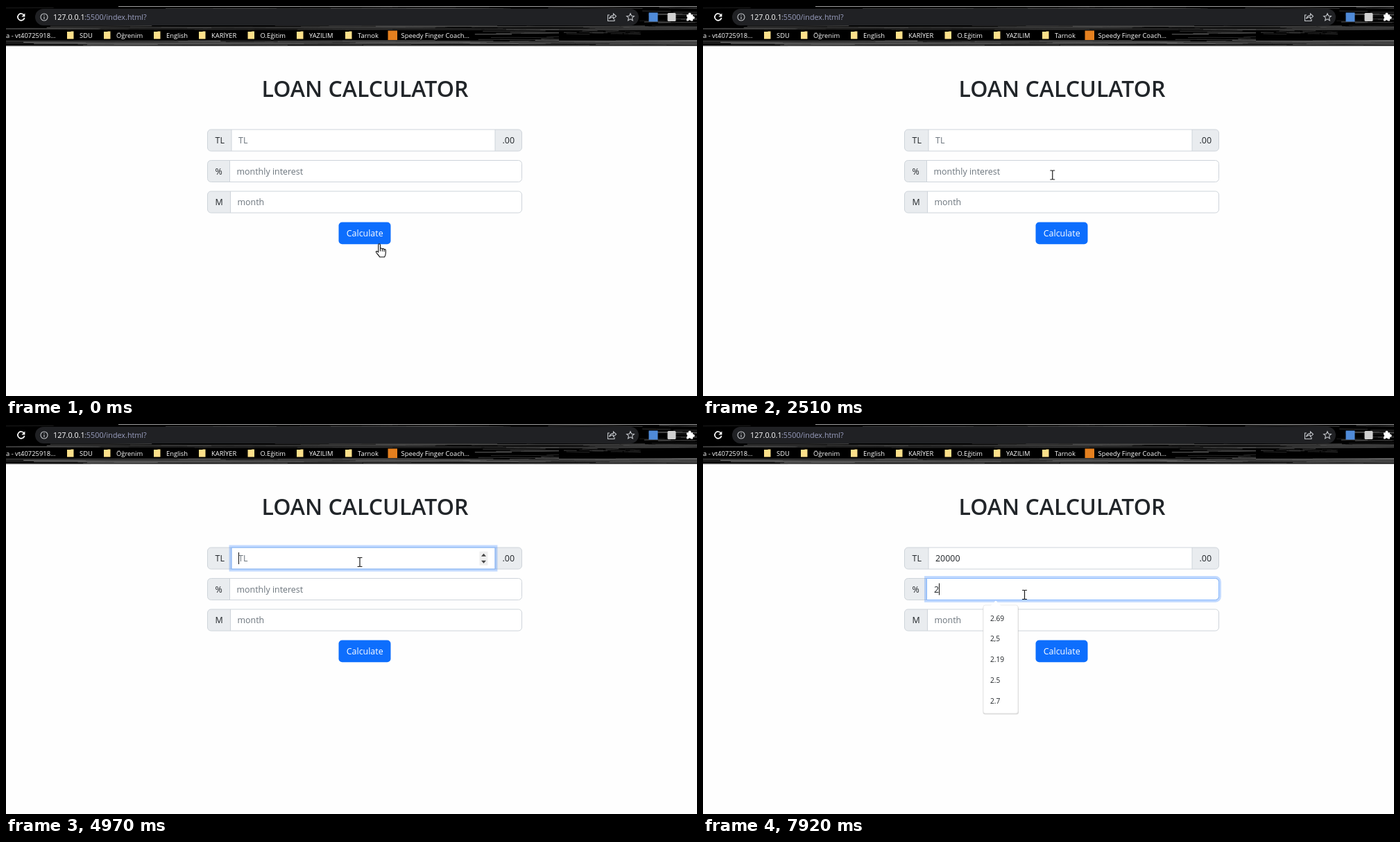
Recreate the animation shown at these times as an HTML page. Size 996 px wide and 562 px high, loop 8 s.

```html
<!DOCTYPE html>
<html lang="en">
<head>
<meta charset="utf-8">
<title>Loan calculator</title>
<style>
  html, body { margin: 0; width: 100%; height: 100%; overflow: hidden; background: #fff; }
  svg { display: block; width: 100%; height: 100%; }
  text { font-family: "Open Sans", "Noto Sans", sans-serif; font-size: 12.45px; fill: #212529; white-space: pre; }
  .hint { fill: #6c757d; }
  .mid { text-anchor: middle; }
  .mark { font-size: 9.4px; fill: #fff; }
  .url { font-size: 10.8px; fill: #fff; }
  .path { fill: #9a9fc0; }
  .item { font-size: 10.2px; }
  .line { fill: none; stroke: #ced4da; }
  .icon { fill: none; stroke: #c4c7cb; stroke-width: 1.1; }
</style>
</head>
<body>
<svg viewBox="0 0 996 562" preserveAspectRatio="none">
  <rect width="996" height="562" fill="#fefefe"/>

  <g id="browser">
    <rect width="996" height="57.5" fill="#000"/>
    <g id="grain" fill="none"></g>
    <path d="M162 .5H996" stroke="#a0a0a0"/>
    <rect x="42" y="4" width="870" height="24" rx="12" fill="#202124"/>
    <path class="icon" style="stroke:#fff;stroke-width:1.7" d="M25.8 13A4.9 4.9 0 1 0 26.6 17"/>
    <path d="M27.4 10.4V15.4H22.4Z" fill="#fff"/>
    <circle class="icon" cx="55" cy="16" r="5"/>
    <path class="icon" d="M55 15.2V19M55 12.8V14"/>
    <text class="url" x="68" y="20">127.0.0.1</text>
    <text class="url path" x="113" y="20">:5500/index.html?</text>
    <path class="icon" d="M870 13H867.5V21.5H877V19M869.5 18.5Q870.5 14 875.5 13.6V11L879.5 14.8L875.5 18.3V16Q871.5 16 869.5 18.5Z"/>
    <path class="icon" d="M900 10.7L901.6 14.2L905.4 14.6L902.5 17.1L903.4 20.9L900 18.9L896.6 20.9L897.5 17.1L894.6 14.6L898.4 14.2Z"/>
    <rect x="926.5" y="9.5" width="13" height="13" fill="#4f8ad8"/>
    <rect x="953.5" y="10" width="12" height="12" rx="1.5" fill="#d0d0d0"/>
    <path fill="#fff" d="M981 12.5H983.7A2 2 0 1 1 987.3 12.5H990V15A2 2 0 1 1 990 18.7V21.5H987A1.8 1.8 0 0 0 983.6 21.5H981V18.5A1.7 1.7 0 0 0 981 15.3Z"/>
    <g id="marks"></g>
  </g>

  <g id="alert">
    <rect x="211" y="97.5" width="612" height="48.5" rx="5" fill="#fff3cd"/>
    <text class="mid" x="517" y="127" style="fill:#664d03">Please type validate inputs!</text>
  </g>

  <g id="form">
    <text class="mid" x="517.5" y="131" style="font-size:32.1px;font-weight:600">LOAN CALCULATOR</text>
    <g id="fields"></g>
    <rect id="button" x="479.5" y="311.6" width="75" height="31.6" rx="5"/>
    <text class="mid" x="517.2" y="332.3" style="fill:#fff">Calculate</text>
    <path id="ringAmount"/><path id="ringRate"/>
    <text id="amount" x="335" y="198"></text>
    <text id="rate" x="333" y="242.5"></text>
    <g id="spinAmount"></g>
    <g id="spinMonth"></g>
    <rect id="caret" width="1" height="17" fill="#111"/>
  </g>

  <g id="list">
    <rect id="shade" x="403.5" y="262.5" width="51.5" rx="3" fill="#000" opacity=".14"/>
    <rect id="sheet" x="404" y="261" width="50" rx="3" fill="#fff" stroke="#e3e3e3" stroke-width=".7"/>
    <path d="M414.5 262L422 254.5L429.5 262Z" fill="#fff"/>
    <g id="items"></g>
  </g>

  <circle id="halo" r="10" fill="#f9f93c" opacity=".88"/>
  <g id="cursor" stroke-linejoin="round" stroke-linecap="round">
    <path id="beam" fill="none" stroke="#1c1c1c" stroke-width="1.2" d="M-3 -6.5H-1L0 -6L1 -6.5H3M0 -6V6M-3 6.5H-1L0 6L1 6.5H3"/>
    <path id="arrow" fill="#fff" stroke="#111" d="M0 0V13.5L3.2 10.6L5.3 15.5L7.4 14.6L5.3 9.8H9.6Z"/>
    <path id="hand" fill="#fff" stroke="#111" stroke-width="1.1" d="M-1.3 11V1.2Q-1.3 -.3 0 -.3T1.5 1.2V6.5Q3 5.3 4.3 7Q5.8 6 7 7.7Q9.3 7 9.3 9.5V13Q9.3 15.5 7.6 18.7H.6Q-.5 16.5 -3 14Q-5.3 11.5 -4.3 10.5Q-3 9.6 -1.3 12M1.5 6.5V10M4.3 7.2V10.2M7 8V10.5"/>
  </g>
</svg>

<script>
const LOOP = 8000, TICK = 70, SHIFT = 61;
const $ = id => document.getElementById(id);
const set = (id, attrs) => { for (const k in attrs) $(id).setAttribute(k, attrs[k]); };
const show = (id, on) => $(id).setAttribute('visibility', on ? 'visible' : 'hidden');
const clamp = v => Math.max(0, Math.min(1, v));
const ramp = (t, from, to) => clamp((t - from) / (to - from));
const within = (t, ...spans) => spans.some(([a, b]) => t >= a && t < b);
const text = (x, y, cls, s) => `<text class="${cls}" x="${x}" y="${y}">${s}</text>`;

// Long, nearly level grain of the browser theme
let seed = 11;
const rnd = (from, to) => (seed = seed * 16807 % 2147483647) / 2147483647 * (to - from) + from;
function grain(count, [left, right], [top, bottom], [short, long], [dark, light]) {
  let out = '';
  for (let i = 0; i < count; i++) {
    const x = rnd(left, right), y = rnd(top, bottom), length = Math.min(rnd(short, long), right - x);
    const grey = Math.round(rnd(dark, light)), bow = rnd(-.8, .8), drop = rnd(-.7, .7);
    out += `<path d="M${x} ${y}q${length / 2} ${bow} ${length} ${drop}"
      stroke="rgb(${grey},${grey},${grey})" stroke-width="${rnd(.5, 1.3)}"/>`;
  }
  return out;
}
$('grain').innerHTML =
  grain(16, [-80, 996], [1.5, 4], [80, 300], [30, 80]) +
  grain(34, [-80, 996], [28.5, 34], [120, 360], [30, 85]) +
  grain(56, [-80, 996], [50, 57], [120, 400], [40, 120]) +
  grain(16, [668, 797], [33, 51], [40, 110], [35, 85]) +
  grain(16, [912, 996], [4, 28], [30, 84], [35, 95]) +
  grain(14, [799, 915], [36, 40.5], [12, 35], [45, 70]) +
  grain(12, [799, 996], [29, 34], [60, 180], [45, 90]);

const folders = [[88, 'SDU'], [141, 'Öğrenim'], [213, 'English'], [278, 'KARİYER'], [348.5, 'O.Eğitim'], [419, 'YAZILIM'], [489, 'Tarnok']];
$('marks').innerHTML = text(0, 45.5, 'mark', 'a - vt40725918...') +
  folders.map(([x, name]) => `<path d="M${x} 37H${x + 5}L${x + 6} 36.5H${x + 9.5}V47.5H${x}Z" fill="#fde08a"/>` +
    text(x + 18, 45.5, 'mark', name)).join('') +
  '<rect x="550.5" y="35.5" width="13.5" height="13.5" fill="#e5801f"/>' +
  text(569.5, 45.5, 'mark', 'Speedy Finger Coach...');

// Input rows: top, split after the label, label, hint id, hint, hint x
const rows = [
  [178, 325, 'TL', 'hintAmount', 'TL', 335],
  [222.5, 322.5, '%', 'hintRate', 'monthly interest', 332.5],
  [267, 323.5, 'M', 'hintMonth', 'month', 333.5]
];
$('fields').innerHTML = rows.map(([y, split, label, id, hint, x]) =>
  `<rect x="290.5" y="${y}" width="453" height="31" rx="5" fill="#fff"/>
   <path d="M${split} ${y}H295.5a5 5 0 0 0 -5 5v21a5 5 0 0 0 5 5H${split}Z" fill="#e9ecef"/>` +
  (id === 'hintAmount' ? `<path d="M705 ${y}H738.5a5 5 0 0 1 5 5v21a5 5 0 0 1 -5 5H705Z" fill="#e9ecef"/>
    <path class="line" d="M705 ${y}v31"/>` + text(715.5, y + 20, '', '.00') : '') +
  `<path class="line" d="M${split} ${y}v31"/>
   <rect class="line" x="290.5" y="${y}" width="453" height="31" rx="5"/>` +
  text(301.5, y + 20, '', label) +
  `<g id="${id}">${text(x, y + 20, 'hint', hint)}</g>`).join('');

const spinner = (x, y) => `<rect x="${x - 6}" y="${y - 10}" width="12" height="20" fill="#efefef"/>
  <path d="M${x - 3.5} ${y - 3}h7l-3.5 -4ZM${x - 3.5} ${y + 3}h7l-3.5 4Z" fill="#444"/>`;
$('spinAmount').innerHTML = spinner(688.5, 193.7);
$('spinMonth').innerHTML = spinner(726.5, 283);

// Pointer: time, x, y, shape
const pointer = [
  [0, 538, 343, 'hand'], [70, 538, 343, 'hand'], [270, 533, 338, 'hand'],
  [480, 533, 338, 'beam'], [1559, 533, 338, 'beam'], [1560, 526.5, 327, 'beam'],
  [1630, 522.5, 320, 'arrow'], [1899, 522.5, 320, 'arrow'], [1900, 514, 290, 'beam'],
  [1970, 505, 250, 'beam'], [2300, 505, 250, 'beam'], [2640, 503, 239.5, 'beam'],
  [2770, 503, 239.5, 'beam'], [3060, 507, 226, 'beam'], [3130, 504, 217, 'arrow'], [3200, 504.5, 215.5, 'arrow'],
  [3400, 504.5, 215.5, 'arrow'], [3540, 508, 204, 'beam'], [3740, 510, 199, 'beam'],
  [6499, 510, 199, 'beam'], [6500, 494.5, 209, 'beam'], [6570, 491, 213, 'arrow'],
  [6710, 483, 228, 'beam'], [7110, 463.5, 246, 'beam'], [LOOP, 463.5, 246, 'beam']
];
function pointerAt(t) {
  const i = pointer.findIndex((p, k) => k === pointer.length - 1 || t < pointer[k + 1][0]);
  const a = pointer[i], b = pointer[i + 1] || a;
  const u = b === a ? 0 : Math.floor((t - a[0]) / TICK) * TICK / (b[0] - a[0]);
  return [a[1] + (b[1] - a[1]) * u, a[2] + (b[2] - a[2]) * u, a[3]];
}

const keyTimes = [5300, 5500, 5770, 5900, 6100];
const items = ['2.69', '2,5', '2.19', '2.5', '2.7', '1.5'];
$('items').innerHTML = items.map((s, i) => `<g id="item${i}">${text(414, 283.5 + i * 29.8, 'item', s)}</g>`).join('');

// Focus glow, square on the left, growing outwards with k
function ring(id, x, y, right, radius, k) {
  const frame = (g, r) => `M${x - g} ${y - g}H${right + g - r}a${r} ${r} 0 0 1 ${r} ${r}V${y + 31 + g - r}a${r} ${r} 0 0 1 ${-r} ${r}H${x - g}Z`;
  const grow = 3.4 * k;
  set(id, {
    d: frame(grow, radius ? radius + grow : 0) + frame(0, radius),
    fill: `rgba(13,110,253,${.25 * k})`, 'fill-rule': 'evenodd'
  });
  set(id + 'Edge', { d: frame(0, radius), opacity: k });
}
for (const id of ['ringAmount', 'ringRate'])
  $(id).insertAdjacentHTML('afterend', `<path id="${id}Edge" fill="none" stroke="#86b7fe"/>`);

function buttonColour(t) {
  const plain = [13, 110, 253], pressed = [10, 88, 202];
  const k = Math.min(ramp(t, 70, 340), 1 - ramp(t, 560, 700));
  return `rgb(${plain.map((c, i) => Math.round(c + (pressed[i] - c) * k))})`;
}

function draw(t) {
  const warned = within(t, [480, 2230]);
  show('alert', warned);
  set('form', { transform: `translate(0 ${warned ? SHIFT : 0})` });
  set('button', { fill: buttonColour(t) });

  const typed = keyTimes.filter(k => t >= k).length;
  const rate = t >= 7790 ? '2' : '';
  $('amount').textContent = '20000'.slice(0, typed);
  $('rate').textContent = rate;
  show('hintAmount', !typed);
  show('hintRate', !rate);

  ring('ringAmount', 325, 178, 705, 0, ramp(t, 3880, 4020) - ramp(t, 7250, 7390));
  ring('ringRate', 322.5, 222.5, 743.5, 5, ramp(t, 7250, 7390));
  show('spinAmount', within(t, [1970, 2230], [3540, 7250]));
  show('spinMonth', within(t, [480, 1630]));

  const onRate = t >= 7250;
  set('caret', onRate ? { x: 332.8 + rate.length * 7.2, y: 229.5 } : { x: 335 + typed * 7.2, y: 185 });
  show('caret', within(t, [3880, 4420], [4970, 6640], [7180, LOOP]));

  const count = t < 7920 ? 6 : 5;
  show('list', onRate);
  set('sheet', { height: 7 + count * 29.8 });
  set('shade', { height: 7 + count * 29.8 });
  $('item5').style.display = count > 5 ? '' : 'none';

  const [x, y, shape] = pointerAt(t);
  set('cursor', { transform: `translate(${x} ${y})` });
  for (const s of ['beam', 'arrow', 'hand']) show(s, s === shape);
  set('halo', { cx: x - .8, cy: y - .5 });
  show('halo', within(t, [340, 480], [3740, 3950], [7110, 7320]));
}

const start = performance.now();
function tick() {
  draw((performance.now() - start) % LOOP);
  requestAnimationFrame(tick);
}
tick();
</script>
</body>
</html>
```
